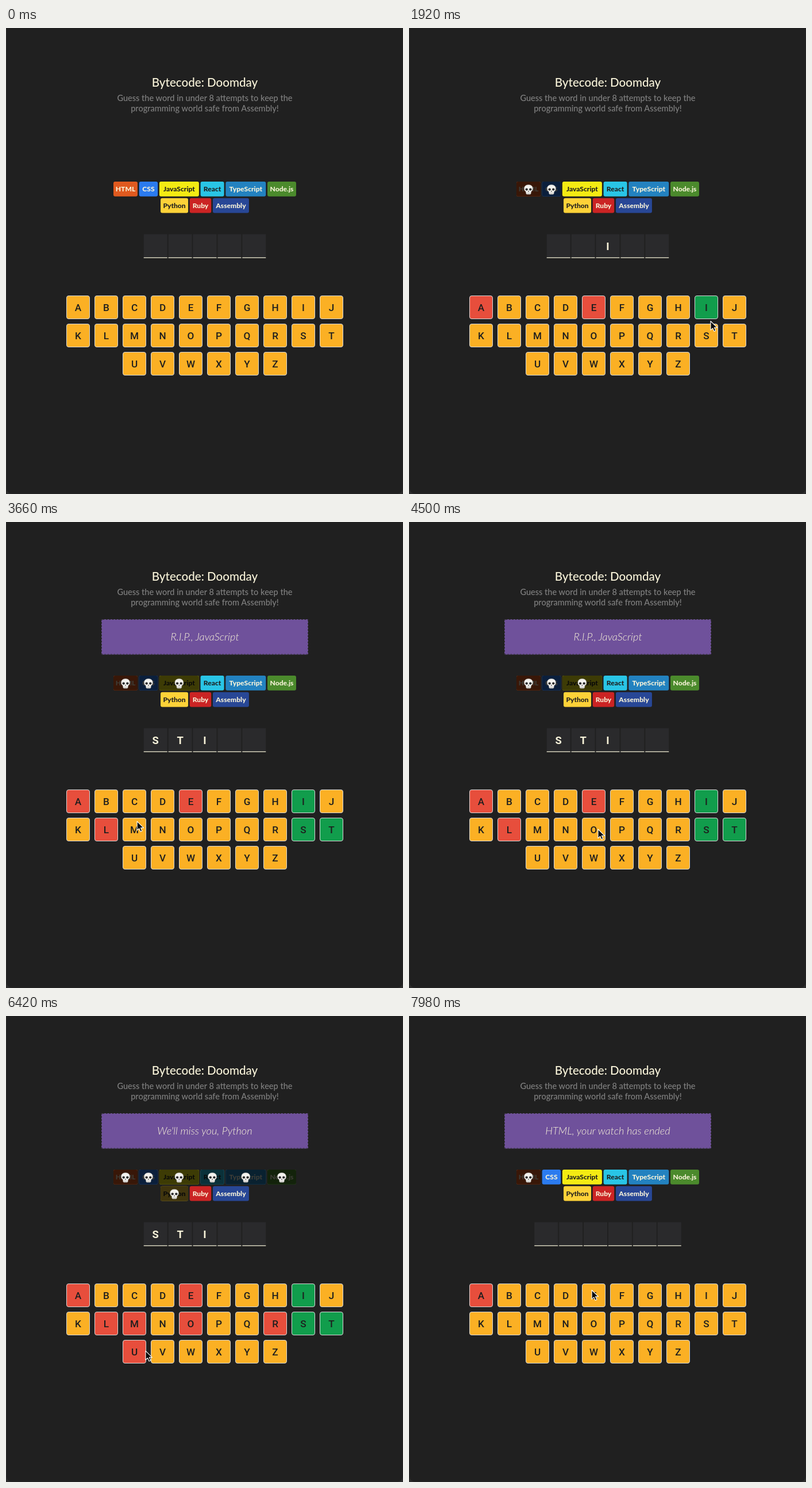
An HTML page that plays this animation: 691x810 px, repeating every 8000 ms.

```html
<!DOCTYPE html>
<html lang="en">
<head>
<meta charset="utf-8">
<title>Word game</title>
<style>
  html, body { margin: 0; width: 100%; height: 100%; overflow: hidden; background: #2c2c2c; }
  svg { display: block; width: 100%; height: 100%; }
  text { text-anchor: middle; font-family: Lato, "Open Sans", sans-serif; }
  .title { font-size: 20.6px; font-weight: 500; fill: #f9f4da; }
  .intro { font-size: 14.57px; font-weight: 500; fill: #808080; }
  .note { font-size: 18.3px; font-weight: 300; font-style: italic; fill: #f9f4da; }
  .chip { font-size: 12.1px; font-weight: 800; }
  .slot { font: 700 18.4px Roboto, Inter, sans-serif; fill: #f9f4da; }
  .key { font: 500 17.2px Roboto, Inter, sans-serif; fill: #1e1e1e; }
</style>
</head>
<body>
<svg id="stage" viewBox="0 0 691 810">
  <defs>
    <g id="skull">
      <path d="M0-8C-5-8-7.6-5-7.4-1.2C-7.3 1.2-6.6 2.6-4.6 3.6L-4.1 7Q-4 8.4-2.6 8.5H2.6Q4 8.4 4.1 7L4.6 3.6C6.6 2.6 7.3 1.2 7.4-1.2C7.6-5 5-8 0-8Z"
        fill="#f3f2ee" stroke="#b9b8b4" stroke-width=".6"/>
      <ellipse cx="-3.3" rx="2.2" ry="2.1" fill="#29292b"/>
      <ellipse cx="3.3" rx="2.2" ry="2.1" fill="#29292b"/>
      <path d="M0 1.9L-1.2 4H1.2Z" fill="#3a3a3a"/>
      <path d="M-1.9 5.6V8M0 5.6V8M1.9 5.6V8" stroke="#8b8a88" stroke-width=".6"/>
    </g>
  </defs>
  <rect x="1" y="-20" width="689.5" height="829.5" rx="9" fill="#202020"/>
  <text class="title" x="346" y="102.3">Bytecode: Doomday</text>
  <text class="intro" x="346" y="126.8">Guess the word in under 8 attempts to keep the</text>
  <text class="intro" x="346" y="145">programming world safe from Assembly!</text>
  <g id="banner">
    <rect x="166" y="169" width="360" height="61.5" rx="2" fill="#6f519b"/>
    <rect x="166.5" y="169.5" width="359" height="60.5" rx="2" fill="none" stroke="#323232" stroke-dasharray="2.7"/>
    <text id="note" class="note" x="346" y="206"></text>
  </g>
  <g id="chips"></g>
  <g id="slots"></g>
  <g id="keys"></g>
  <path id="cursor" d="M0 0V15.6L3.6 12.3L6 17.8L8.8 16.6L6.4 11.2H11.3Z"
    fill="#0a0a0a" stroke="#fff" stroke-width="1.1" stroke-linejoin="round"/>
</svg>
<script>
const LOOP = 8000, STEP = 60, RESET = 7200, HOLD = 60, MID = 346;
const LIGHT = "#f9f4da", DARK = "#1e1e1e";
const $ = id => document.getElementById(id);

function add(parent, tag, attrs, text = "") {
  const el = document.createElementNS($("stage").namespaceURI, tag);
  for (const name in attrs) el.setAttribute(name, attrs[name]);
  el.textContent = text;
  return parent.appendChild(el);
}
const show = (el, on) => el.setAttribute("visibility", on ? "visible" : "hidden");

// Left edges of items centred in a row
function centred(widths, gap) {
  let x = MID - (widths.reduce((sum, w) => sum + w + gap, -gap)) / 2;
  return widths.map(w => (x += w + gap) - w - gap);
}

// Chips: name, width, fill, text colour
const langRows = [
  [
    ["HTML", 42, "#e05a1f", LIGHT], ["CSS", 32.5, "#2b7bef", LIGHT],
    ["JavaScript", 69, "#f4eb13", DARK], ["React", 41, "#29c5e6", DARK],
    ["TypeScript", 70, "#2382c0", LIGHT], ["Node.js", 50, "#4b8a2c", LIGHT]
  ],
  [["Python", 48, "#fed238", DARK], ["Ruby", 37.5, "#cb2424", LIGHT], ["Assembly", 63, "#284796", LIGHT]]
];
const shades = langRows.flatMap((row, r) => {
  const lefts = centred(row.map(lang => lang[1]), 2.7), y = 267 + 28.7 * r;
  return row.map(([name, width, fill, ink], i) => {
    const x = lefts[i], mid = x + width / 2;
    const box = { x, y, width, height: 25.8, rx: 3 };
    add($("chips"), "rect", { ...box, fill });
    add($("chips"), "text", { class: "chip", x: mid, y: y + 17.4, fill: ink }, name);
    const shade = add($("chips"), "g", {});
    add(shade, "rect", { ...box, fill: "#000", opacity: .75 });
    add(shade, "use", { href: "#skull", x: mid, y: y + 13.6 });
    return shade;
  });
});

const keys = {};
["ABCDEFGHIJ", "KLMNOPQRST", "UVWXYZ"].forEach((row, r) => {
  const lefts = centred([...row].map(() => 41), 8);
  [...row].forEach((letter, i) => {
    const x = lefts[i], y = 465 + 49 * r;
    const box = add($("keys"), "rect",
      { x: x + .5, y: y + .5, width: 40, height: 40, rx: 3.5, stroke: "#d7d7d7" });
    add($("keys"), "text", { class: "key", x: x + 20.5, y: y + 27 }, letter);
    keys[letter] = { box, tip: [x + 28, y + 20] };
  });
});

const slots = Array.from({ length: 6 }, () => {
  const g = add($("slots"), "g", {});
  add(g, "rect", { y: 358.5, width: 41, height: 41, fill: "#2a2a2c" });
  add(g, "rect", { y: 398.7, width: 41, height: 1.2, fill: LIGHT });
  return { g, label: add(g, "text", { class: "slot", x: 20.5, y: 385.5 }) };
});

// A note marks a miss, a number is the place of a hit
const guess = (at, letter, result) =>
  ({ at, letter, result, miss: typeof result === "string", tip: keys[letter].tip });
const guesses = [
  guess(420, "A", "Adios, HTML"),
  guess(960, "E", "Farewell, CSS"),
  guess(1620, "I", 2),
  guess(2220, "S", 0),
  guess(2520, "T", 1),
  guess(3100, "L", "R.I.P., JavaScript"),
  guess(4560, "O", "Oh no, not React!"),
  guess(5220, "R", "TypeScript bites the dust"),
  guess(5760, "M", "Farewell, Node.js"),
  guess(6180, "U", "We'll miss you, Python"),
  guess(7740, "A", "HTML, your watch has ended"),
  guess(8070, "E", "")
];
const stops = [{ at: 0, tip: [-20, 620] }, ...guesses, { at: RESET, tip: [MID, 640] }]
  .sort((a, b) => a.at - b.at);

// The pointer rests at each click and glides between them in a shallow arc
function pointer(t) {
  const next = stops.findIndex(stop => stop.at > t);
  const from = stops[next - 1], to = stops[next];
  const span = to.at - from.at - 2 * HOLD;
  const u = Math.min(1, Math.max(0, (t - from.at - HOLD) / span));
  const ease = u * u * (3 - 2 * u);
  const [dx, dy] = [0, 1].map(axis => to.tip[axis] - from.tip[axis]);
  const lift = .1 * Math.abs(dx) * Math.sin(Math.PI * u);
  return [from.tip[0] + dx * ease, from.tip[1] + dy * ease - lift];
}

function render(t) {
  const start = t < RESET ? 0 : RESET;
  const made = guesses.filter(({ at }) => at >= start && at <= t);
  const misses = made.filter(({ miss }) => miss).length;
  const last = made[made.length - 1];
  const wrong = !!last && last.miss;

  show($("banner"), wrong);
  $("note").textContent = wrong ? last.result : "";
  shades.forEach((shade, i) => show(shade, i < misses));

  for (const letter in keys) {
    const tried = made.find(g => g.letter === letter);
    keys[letter].box.setAttribute("fill", !tried ? "#fbb024" : tried.miss ? "#e74e3c" : "#119d4c");
  }

  const lefts = centred(Array(start ? 6 : 5).fill(41), 1.9);
  slots.forEach(({ g, label }, i) => {
    show(g, i < lefts.length);
    g.setAttribute("transform", `translate(${lefts[i] || 0} 0)`);
    const hit = made.find(({ result }) => result === i);
    label.textContent = hit ? hit.letter : "";
  });

  $("cursor").setAttribute("transform", `translate(${pointer(t)})`);
}

const begin = performance.now();
function tick() {
  const t = (performance.now() - begin) % LOOP;
  render(Math.floor(t / STEP) * STEP);
  requestAnimationFrame(tick);
}
tick();
</script>
</body>
</html>
```
